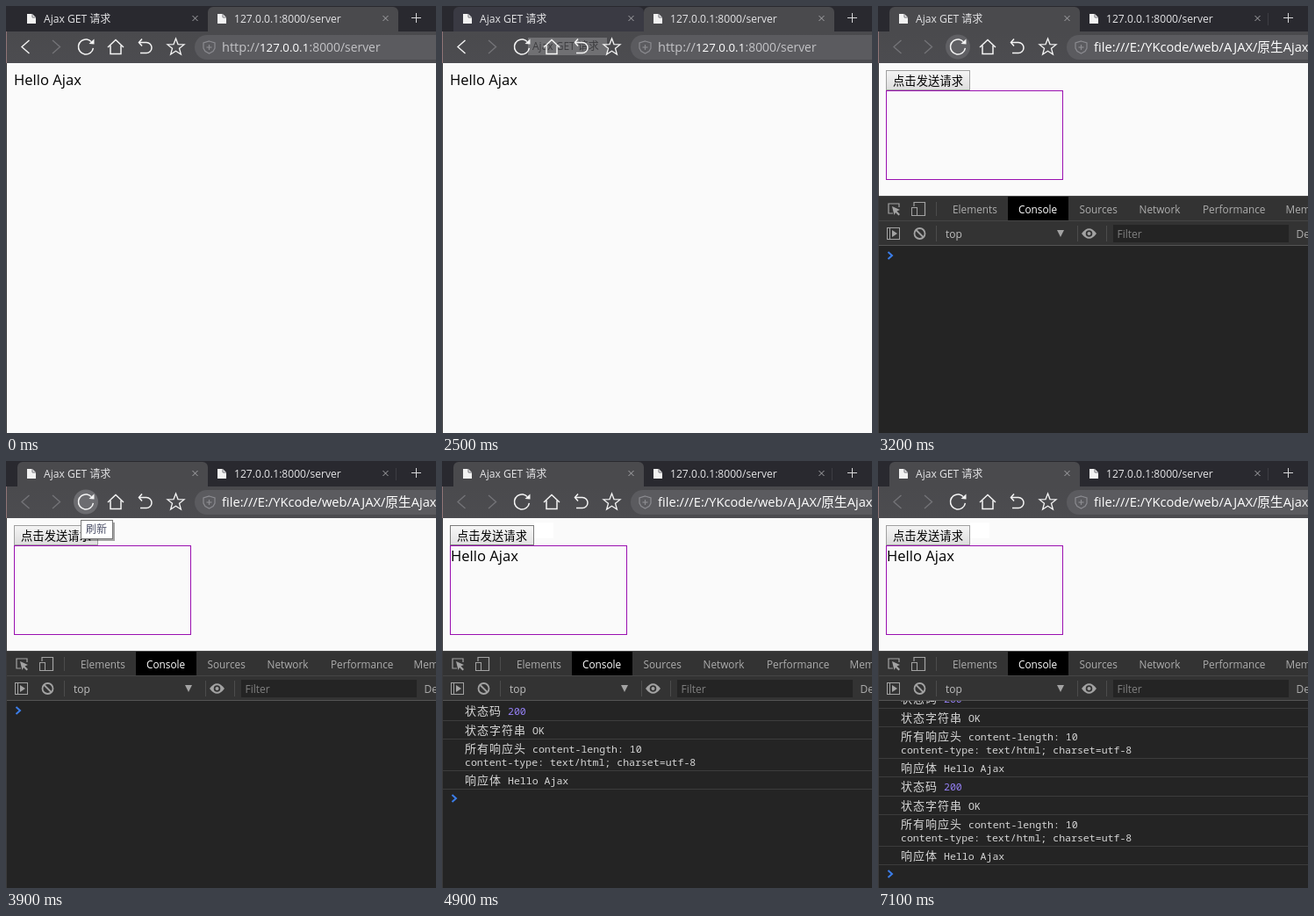
These frames come from a looping animation (490x486 px, 8200 ms). An HTML page with a canvas:

```html
<!DOCTYPE html>
<html lang="zh">
<head>
<meta charset="utf-8">
<title>Ajax GET</title>
<style>
html, body { margin: 0; width: 100%; height: 100%; overflow: hidden; background: #fafafa; }
canvas { display: block; }
</style>
</head>
<body>
<canvas id="stage" width="490" height="486"></canvas>
<script>
const ctx = document.getElementById('stage').getContext('2d');
const LOOP = 8200;
const UI = '"Open Sans", "Noto Sans CJK SC", "Noto Sans CJK", sans-serif';
const MONO = '"Noto Sans Mono", "DejaVu Sans Mono", monospace';

const clamp = v => Math.max(0, Math.min(1, v));
const within = (t, a, b) => t >= a && t < b;
// fades in over three ticks from a, out over two ticks from b
const fade = (t, a, b) => clamp((t - a + 100) / 300) * (1 - clamp((t - b + 100) / 200));

function box(x, y, w, h, fill) {
  ctx.fillStyle = fill;
  ctx.fillRect(x, y, w, h);
}

function frame(x, y, w, h, color) {
  ctx.strokeStyle = color;
  ctx.lineWidth = 1;
  ctx.strokeRect(x + 0.5, y + 0.5, w - 1, h - 1);
}

function label(s, x, y, color, size = 12, family = UI, weight = 400) {
  ctx.font = `${weight} ${size}px ${family}`;
  ctx.fillStyle = color;
  ctx.fillText(s, x, y);
}

function line(points, color, width = 1.5, close = false) {
  ctx.beginPath();
  points.forEach(([x, y]) => ctx.lineTo(x, y));
  if (close) ctx.closePath();
  ctx.strokeStyle = color;
  ctx.lineWidth = width;
  ctx.stroke();
}

function poly(points, color) {
  ctx.beginPath();
  points.forEach(([x, y]) => ctx.lineTo(x, y));
  ctx.fillStyle = color;
  ctx.fill();
}

function disc(x, y, r, color) {
  ctx.beginPath();
  ctx.arc(x, y, r, 0, 7);
  ctx.fillStyle = color;
  ctx.fill();
}

function arc(x, y, r, from, to, color, width = 1.5) {
  ctx.beginPath();
  ctx.arc(x, y, r, from, to);
  ctx.strokeStyle = color;
  ctx.lineWidth = width;
  ctx.stroke();
}

function round(x, y, w, h, r, color) {
  ctx.beginPath();
  ctx.roundRect(x, y, w, h, r);
  ctx.fillStyle = color;
  ctx.fill();
}

function shade(y0, y1, from, to) {
  const g = ctx.createLinearGradient(0, y0, 0, y1);
  g.addColorStop(0, from);
  g.addColorStop(1, to);
  return g;
}

function tab(x, title, active, hover) {
  if (active) round(x, 1, 217, 29, [6, 6, 0, 0], '#4a4a4d');
  else if (hover) {
    ctx.globalAlpha = hover;
    round(x, 1, 217, 28, [6, 6, 0, 0], '#3a3a43');
    ctx.globalAlpha = 1;
  }
  const ix = x + 11;
  poly([[ix, 9], [ix + 6, 9], [ix + 10, 13], [ix + 10, 20], [ix, 20]], '#f2f2f2');
  line([[ix + 6, 9], [ix + 6, 13], [ix + 10, 13]], '#77777c', 1);
  label(title, x + 30, 19, '#e4e4e6', 12.1, UI, 500);
  const cx = x + 202.5;
  line([[cx - 3, 11], [cx + 3, 17]], '#a5a5a8', 1);
  line([[cx + 3, 11], [cx - 3, 17]], '#a5a5a8', 1);
}

function reload(turn, dim) {
  ctx.save();
  ctx.translate(91, 46.5);
  ctx.rotate(turn);
  ctx.globalAlpha = dim ? 0.65 : 1;
  arc(0, 0, dim ? 7.5 : 8.5, 0.15, 5.5, '#f4f4f4');
  poly([[9.5, -9], [9.5, -3], [3.5, -3.5]], '#f4f4f4');
  ctx.restore();
}

function star(x, y) {
  const pts = Array.from({ length: 10 }, (_, i) => {
    const r = i % 2 ? 4.2 : 10, a = i * Math.PI / 5 - Math.PI / 2;
    return [x + r * Math.cos(a), y + r * Math.sin(a)];
  });
  line(pts, '#f4f4f4', 1.3, true);
}

function toolbar(t, local) {
  const white = '#f4f4f4', off = '#737377';
  box(0, 29, 490, 36, shade(29, 65, '#4a4a4d', '#4c4c50'));

  if (within(t, 2500, 2700)) {
    box(98, 36, 90, 20, local ? '#5d5d60' : '#707073');
    label('Ajax GET 请求', 103, 50, local ? '#38383b' : '#3c3c3f');
  }

  const hover = Math.max(fade(t, 900, 1800), fade(t, 2900, 4000));
  if (hover) {
    ctx.globalAlpha = hover;
    disc(91, 46.5, 14, within(t, 3200, 3400) ? '#606064' : '#6c6c70');
    ctx.globalAlpha = 1;
  }

  line([[26.5, 39], [18, 46.5], [26.5, 54]], local ? off : white, 1.4);
  line([[53, 39], [61.5, 46.5], [53, 54]], off, 1.4);
  const spin = within(t, 1400, 1700);
  reload(spin ? (t - 1300) / 100 * Math.PI / 2 : 0, spin);
  line([[116, 47], [125, 38.5], [134, 47]], white);
  line([[119, 45], [119, 54.5], [131, 54.5], [131, 45]], white);

  line([[155, 37.5], [151.5, 41.5], [155, 45.5]], white);
  line([[152, 41.5], [160, 41.5]], white);
  arc(160, 47.5, 6, -Math.PI / 2, Math.PI / 2, white);
  line([[160, 53.5], [153, 53.5]], white);
  star(193.5, 47);

  round(215, 33, 290, 28, 14, '#5b5b5f');
  line([[231.5, 40], [238, 42], [238, 48], [236, 51.5], [231.5, 54],
        [227, 51.5], [225, 48], [225, 42]], '#8b8b90', 1.2, true);
  line([[231.5, 44], [231.5, 50]], '#8b8b90', 1.2);
  line([[228.5, 47], [234.5, 47]], '#8b8b90', 1.2);

  if (local) label('file:///E:/YKcode/web/AJAX/原生Ajax', 246, 52, '#fff', 14.7, UI, 500);
  else {
    label('http://', 246, 52, '#c3c3c6', 14.6);
    label('127.0.0.1', 289, 52, '#fff', 13.3, UI, 500);
    label(':8000/server', 345.5, 52, '#c3c3c6', 13.9);
  }
}

function chrome(t, local) {
  box(0, 0, 490, 29, '#29292f');
  tab(13, 'Ajax GET 请求', local, clamp((t - 1800) / 200));
  tab(230, '127.0.0.1:8000/server', !local, 0);
  if (local) box(444, 8, 1, 14, '#3d3d43');
  line([[462, 13.5], [473, 13.5]], '#d8d8da', 1);
  line([[467.5, 8], [467.5, 19]], '#d8d8da', 1);
  toolbar(t, local);
}

function button(t) {
  const down = within(t, 4800, 4900) || within(t, 6200, 6300);
  const over = within(t, 4500, 7100);
  const fill = down ? shade(73, 96, '#d8d8d8', '#eeeeee')
    : over ? shade(73, 96, '#f8f8f8', '#e2e2e2') : shade(73, 96, '#f5f5f5', '#dddddd');
  box(9, 73, 96, 23, fill);
  frame(9, 73, 96, 23, over ? '#7c7c7c' : '#a0a0a0');
  label('点击发送请求', 17, 90, '#000', 13.33);
}

function tip(t) {
  ctx.globalAlpha = 1 - clamp((t - 4000) / 400);
  box(88, 70, 36, 21, 'rgba(0,0,0,.35)');
  box(85, 67, 37, 22, '#fff');
  frame(85, 67, 37, 22, '#767676');
  label('刷新', 91, 82, '#4c5068');
  ctx.globalAlpha = 1;
}

function row(y, head, body, color = '#d6d6d6') {
  ctx.letterSpacing = '1px';
  label(head, 26, y, '#d6d6d6', 13);
  ctx.letterSpacing = '0px';
  label(body, 33 + 14 * head.length, y, color, 11.55, MONO, 500);
}

function batch(y) {
  row(y + 17, '状态码', '200', '#9580f5');
  row(y + 39, '状态字符串', 'OK');
  row(y + 60, '所有响应头', 'content-length: 10');
  label('content-type: text/html; charset=utf-8', 26, y + 75, '#d6d6d6', 11.55, MONO, 500);
  row(y + 96, '响应体', 'Hello Ajax');
  for (const d of [23, 44, 80, 101]) box(1, y + d, 489, 1, '#3c3c3c');
}

function log(count) {
  box(0, 273, 490, 213, '#242424');
  ctx.save();
  ctx.beginPath();
  ctx.rect(0, 273, 490, 213);
  ctx.clip();
  const top = count > 1 ? 258 : 272;
  for (let i = 0; i < count; i++) batch(top + i * 100);
  const y = top + count * 100 + 12;
  line([[11.5, y - 4], [16, y], [11.5, y + 4]], '#3b7de8', 2);
  ctx.restore();
}

function devtools(count) {
  const icon = '#a3a3a3', text = '#adadad';
  box(0, 216, 490, 57, '#333333');
  box(0, 216, 490, 1, '#484848');
  box(0, 244, 490, 1, '#454545');
  box(0, 272, 490, 1, '#545454');
  box(148, 217, 69, 27, '#000');

  line([[17, 236], [12, 236], [12, 225], [24, 225], [24, 229]], icon, 1.2);
  poly([[16, 228], [25, 232], [21.5, 233.5], [25, 237], [23.5, 238.5], [20, 235], [18.5, 238]], icon);
  line([[41, 228], [41, 223.5], [53.5, 223.5], [53.5, 238.5], [45, 238.5]], icon, 1.2);
  frame(38, 229, 7, 10, icon);
  box(66, 223, 1, 16, '#4c4c4c');

  [['Elements', 85], ['Console', 160], ['Sources', 229.5], ['Network', 297.5],
   ['Performance', 370], ['Memory', 464.5]]
    .forEach(([s, x]) => label(s, x, 236, s === 'Console' ? '#fff' : text, 11.8));

  frame(10, 252, 15, 14, icon);
  box(13, 252, 1, 14, icon);
  poly([[16, 255], [22, 259], [16, 263]], icon);
  arc(47.5, 259, 6, 0, 7, icon, 1.8);
  line([[43.5, 255], [51.5, 263]], icon, 1.8);
  for (const x of [66, 227, 260]) box(x, 250, 1, 18, '#4c4c4c');
  label('top', 77, 264, '#bdbdbd');
  poly([[204, 255], [212, 255], [208, 263]], icon);

  ctx.beginPath();
  ctx.moveTo(232, 259);
  ctx.quadraticCurveTo(240.5, 247.5, 249, 259);
  ctx.quadraticCurveTo(240.5, 270.5, 232, 259);
  ctx.fillStyle = icon;
  ctx.fill();
  disc(240.5, 259, 3.8, '#333');
  disc(240.5, 259, 2, icon);

  box(268, 249, 200, 20, '#242424');
  label('Filter', 272.5, 264, '#808080');
  label('Default levels', 476.5, 264, text);
  log(count);
}

function draw(t) {
  const local = t >= 2600;
  const count = t >= 6300 ? 2 : t >= 4900 ? 1 : 0;
  box(0, 0, 490, 486, '#fafafa');
  chrome(t, local);
  if (local) {
    if (t >= 4400) box(105, 70, 22, 18, '#fff');
    button(t);
    frame(9, 96, 202, 102, '#9a10b0');
    if (count) label('Hello Ajax', 10, 114, '#000', 16.6);
    devtools(count);
    if (within(t, 3900, 4400)) tip(t);
  } else {
    label('Hello Ajax', 9, 90, '#000', 16.6);
  }
  box(0, 29, 1, 36, '#8f7476');
  box(0, 65, 1, 421, '#3a3a3c');
}

const start = performance.now();
function tick() {
  const t = (performance.now() - start) % LOOP;
  draw(Math.floor(t / 100) * 100);
  requestAnimationFrame(tick);
}
tick();
</script>
</body>
</html>
```
